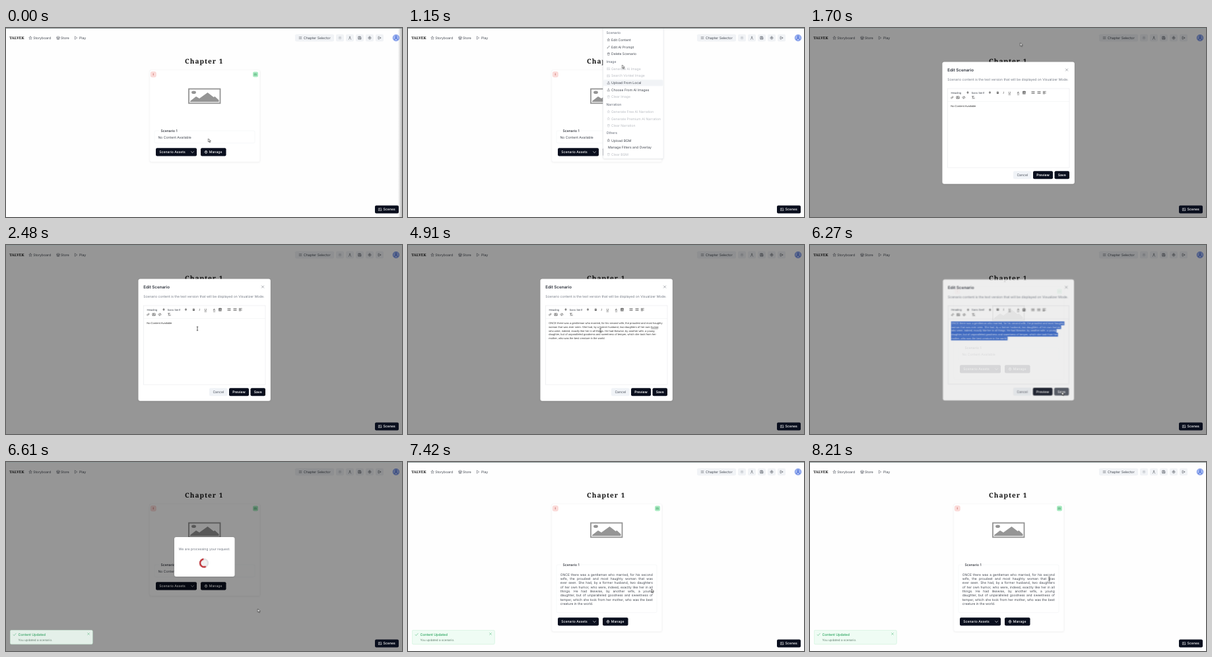
Recreate the animation shown at these times as an HTML page. Size 600 by 287 pixels, loop 8.24 s.

```html
<!DOCTYPE html>
<html lang="en">
<head>
<meta charset="utf-8">
<title>Scenario editor</title>
<style>
  html, body { margin: 0; width: 100%; height: 100%; overflow: hidden; background: #fefefe; }
  svg { display: block; width: 100vw; height: 100vh; }
  text { font-family: Inter, sans-serif; text-rendering: geometricPrecision; white-space: pre; }
  .slab { font-family: "Noto Serif", serif; }
  .rich text { font-family: "Liberation Sans", sans-serif; }
  .pop { transform-box: fill-box; transform-origin: center; }
</style>
</head>
<body>
<svg id="stage" viewBox="0 0 600 287"></svg>
<script>
const LOOP = 8240;
const INK = '#0a0f1e', SLATE = '#40464f', MUTED = '#737984', FAINT = '#b9bcc2', BLUE = '#2f62c9', GREEN = '#25a35a';
const stage = document.getElementById('stage');
const $ = id => document.getElementById(id);

// ---- markup helpers ----
const label = (x, y, str, { size = 5.1, weight = 400, fill = SLATE, more = '' } = {}) =>
  `<text x="${x}" y="${y}" font-size="${size}" font-weight="${weight}" fill="${fill}" ${more}>${str}</text>`;
const box = (x, y, w, h, fill, { r = 2, line = 'none', more = '' } = {}) =>
  `<rect x="${x}" y="${y}" width="${w}" height="${h}" rx="${r}" fill="${fill}" stroke="${line}" stroke-width=".5" ${more}/>`;
const group = (id, body, more = '') => `<g id="${id}" ${more}>${body}</g>`;

// Icons are drawn on a 24 unit grid and centred on x, y.
const shapes = {
  star: 'M12 2l3 7 7 .6-5.4 4.8L18.5 22 12 18l-6.5 4 1.9-7.6L2 9.6 9 9z',
  shop: 'M4 10v11h16V10M2 9l3-6h14l3 6zM9 21v-6h6v6',
  play: 'M6 3l14 9-14 9z',
  lines: 'M3 5h18M3 12h18M3 19h18',
  sun: 'M12 8a4 4 0 1 0 .1 0M12 2v2M12 20v2M2 12h2M20 12h2M5 5l1 1M18 18l1 1M5 19l1-1M18 6l1-1',
  user: 'M12 3a4.5 4.5 0 1 0 .1 0M4 22c0-10 16-10 16 0',
  disk: 'M3 3h14l4 4v14H3zM7 3v5h8V3M7 21v-8h10v8',
  gear: 'M12 2.5a9.5 9.5 0 1 0 .1 0M12 8.5a3.5 3.5 0 1 0 .1 0',
  exit: 'M9 3H3v18h6M15 7l6 5-6 5M21 12H9',
  image: 'M3 4h18v16H3zM8 8a1.5 1.5 0 1 0 .1 0M4 19l6-7 4 4 3-3 4 5',
  pen: 'M3 21l2-6L17 3l4 4L9 19z',
  trash: 'M3 6h18M6 6v15h12V6M9 6V3h6v3',
  upload: 'M3 16v5h18v-5M12 16V3M7 8l5-5 5 5',
  down: 'M5 9l7 7 7-7',
  close: 'M4 4l16 16M20 4L4 20',
  check: 'M3 13l6 6L21 5',
  sort: 'M8 9l4-5 4 5zM8 15l4 5 4-5z',
  code: 'M8 5l-6 7 6 7M16 5l6 7-6 7M14 4l-4 16',
  link: 'M10 14l4-4M11 7l4-4 6 6-4 4M7 11l-4 4 6 6 4-4',
  list: 'M9 5h13M9 12h13M9 19h13M2 5h3M2 12h3M2 19h3',
  align: 'M2 4h20M2 10h12M2 16h20M2 21h12',
  clear: 'M4 4h15M11 4l-3 16M15 14l7 7M22 14l-7 7'
};
const icon = (name, x, y, size = 5.5, color = SLATE, width = 2) =>
  `<path d="${shapes[name]}" transform="translate(${x - size / 2} ${y - size / 2}) scale(${size / 24})" fill="none" stroke="${color}" stroke-width="${width}" stroke-linejoin="round" stroke-linecap="round"/>`;

// ---- page ----
const header = () => {
  const tools = [['sun', 506], ['user', 521], ['disk', 536], ['gear', 551], ['exit', 566]];
  return label(5.3, 17.4, 'TALVEK', { size: 5.5, weight: 800, fill: '#111', more: 'class="slab"' }) +
    icon('star', 37, 15) + label(41.2, 16.9, 'Storyboard') +
    icon('shop', 79, 15) + label(83, 16.9, 'Store') +
    icon('play', 106, 15) + label(111, 16.9, 'Play') +
    box(438, 9.5, 59, 11, '#f1f3f6') + icon('lines', 446, 15, 5) + label(451, 16.9, 'Chapter Selector') +
    tools.map(([name, x]) => box(x - 6, 9.5, 12, 11, '#f1f3f6') +
      icon(name, x, 15, 5.2, name === 'sun' ? '#a3a8b0' : SLATE, 2.4)).join('') +
    `<circle cx="591" cy="15" r="5" fill="#a9bdf3"/>` + icon('user', 591, 14.8, 7, '#2f56cf', 3) +
    `<circle cx="591" cy="15" r="4.7" fill="none" stroke="#5b7be0" stroke-width=".7"/>`;
};

const placeholder = `<rect x="277" y="92.5" width="47.5" height="21.8" fill="#fff" stroke="#959595" stroke-width="1.8"/>
  <ellipse cx="284.5" cy="97.8" rx="3.4" ry="2.3" fill="#959595"/>
  <path d="M279 112.3V111l9-7 5 3 12.5-9 9 7 2-1 6 5.5v2.8z" fill="#959595"/>`;

const tale = [
  'ONCE there was a gentleman who married, for his second',
  'wife, the proudest and most haughty woman that was',
  'ever seen. She had, by a former husband, two daughters',
  'of her own humor, who were, indeed, exactly like her in all',
  'things. He had likewise, by another wife, a young',
  'daughter, but of unparalleled goodness and sweetness of',
  'temper, which she took from her mother, who was the best',
  'creature in the world.'
];

const card = () =>
  box(218, 64, 166.5, 139, '#fff', { line: '#f5f5f6', more: 'id="cardBox" filter="url(#soft)"' }) +
  box(219.3, 66.5, 8, 8, '#fbdcda', { line: '#f6c9c6' }) +
  label(222.5, 72.2, 'I', { size: 4.5, weight: 600, fill: '#b8423d' }) +
  box(374, 66.5, 8, 8, '#a9ebc2') + icon('image', 378, 70.5, 4, '#27834d') +
  placeholder +
  box(225, 156, 152, 18.7, '#fff', { line: '#eef0f3', more: 'id="fieldBox"' }) +
  box(232, 153, 30, 6, '#fff') +
  label(234.5, 158, 'Scenario 1', { weight: 500, fill: '#22262f' }) +
  group('cardEmpty', label(230.5, 168, 'No Content Available')) +
  group('cardTale', tale.map((line, i) => label(230.8, 172.9 + i * 6.27, line, { size: 4.95 })).join('')) +
  group('cardButtons',
    box(227, 182.3, 62, 12.2, INK) + label(232.3, 190.2, 'Scenario Assets', { weight: 500, fill: '#fff' }) +
    icon('down', 282.5, 188.5, 6.5, '#fff', 2.4) +
    box(295, 182.3, 38.5, 12.2, INK) + icon('gear', 303, 188.4, 5.2, '#fff', 3) +
    label(307.8, 190.2, 'Manage', { weight: 500, fill: '#fff' }));

const scenes = box(559, 269.5, 36, 12, INK) + icon('image', 566.8, 275.5, 5.5, '#fff') +
  label(571.5, 277.4, 'Scenes', { weight: 500, fill: '#fff', size: 5.2 });

// ---- menu: text, centre y, icon, enabled; headings have no icon ----
const menuRows = [
  ['Scenario', 7], ['Edit Content', 18, 'star', 1], ['Edit AI Prompt', 28.8, 'pen', 1], ['Delete Scenario', 39.5, 'trash', 1],
  ['Image', 50.7], ['Generate AI Image', 61.9, 'image', 0], ['Search Vonkel Image', 72.6, 'image', 0],
  ['Upload From Local', 83.3, 'upload', 1], ['Choose From AI Images', 94, 'upload', 1], ['Clear Image', 104.5, 'trash', 0],
  ['Narration', 115.7], ['Generate Free AI Narration', 127, 'star', 0], ['Generate Premium AI Narration', 137.7, 'star', 0],
  ['Clear Narration', 148.3, 'trash', 0], ['Others', 159.5], ['Upload BGM', 170.7, 'star', 1],
  ['Manage Filters and Overlay', 181.5, '', 1], ['Clear BGM', 192, 'trash', 0]
];
const menu = box(295.5, -2, 91.5, 200.5, '#fff', { line: '#dfe2e7', more: 'filter="url(#soft)"' }) +
  box(296.2, -4.8, 90, 9.6, '#f1f3f6', { r: 1.5, more: 'id="menuHover"' }) +
  menuRows.map(([str, y, name, on]) => {
    if (name === undefined) return label(300.5, y + 1.8, str, { weight: 500, fill: MUTED });
    const color = on ? SLATE : FAINT;
    return (name ? icon(name, 303.8, y, 4.8, color) : '') + label(name ? 308 : 303, y + 1.8, str, { fill: color });
  }).join('');

// ---- edit dialog ----
const story = [
  'ONCE there was a gentleman who married, for his second wife, the proudest and most haughty',
  'woman that was ever seen. She had, by a former husband, two daughters of her own humor,',
  'who were, indeed, exactly like her in all things. He had likewise, by another wife, a young',
  'daughter, but of unparalleled goodness and sweetness of temper, which she took from her',
  'mother, who was the best creature in the world.'
];
const ROW = 5.77;
const mark = (x, str, more = '') => label(x, 99.9, str, { size: 4.9, fill: '#333', more: 'text-anchor="middle" ' + more });
const tool = (name, x, y) => icon(name, x, y, 5, '#333', 2.6);
const toolbar = label(213.5, 99.6, 'Heading', { size: 4.2 }) + tool('sort', 239, 98) +
  label(244.5, 99.6, 'Sans Serif', { size: 4.2 }) + tool('sort', 272.5, 98) +
  mark(284.5, 'B', 'style="font-weight:700"') + mark(293.3, 'I', 'font-style="italic"') +
  mark(302.3, 'U', 'text-decoration="underline"') + mark(315.5, 'A', 'text-decoration="underline"') +
  box(322.2, 95.8, 4.4, 4.6, '#666', { r: .5 }) + label(322.9, 99.7, 'A', { size: 4.5, fill: '#fff' }) +
  tool('list', 338, 98) + tool('list', 347, 98) + tool('align', 355.3, 98) +
  tool('link', 215.3, 105.5) + tool('image', 224.2, 105.5) + tool('code', 233, 105.5) + tool('clear', 247, 105.5);
const button = (x, w, str, fill, color, weight, more = '') => box(x, 217.3, w, 12, fill, { more }) +
  label(x + w / 2, 225.2, str, { weight, fill: color, more: 'text-anchor="middle"' });

const dialog = box(200.5, 51.5, 200.3, 185.3, '#fff', { r: 3, more: 'filter="url(#soft)"' }) +
  label(208.2, 65.7, 'Edit Scenario', { size: 6.25, weight: 600, fill: '#2d323c' }) + icon('close', 389, 63.5, 5) +
  label(208.2, 80.3, 'Scenario content is the text version that will be displayed on Visualizer Mode.', { size: 5.04, fill: MUTED }) +
  box(208.5, 92, 184.5, 120, '#fff', { r: 0, line: '#e2e4e8' }) +
  box(208.5, 111.5, 184.5, .4, '#e9ebee', { r: 0 }) +
  group('rich', toolbar +
    group('pickEmpty', box(213, 115.8, 39.2, 5.8, BLUE, { r: 0 })) +
    group('editEmpty', `<text x="213.2" y="120" font-size="4.1">No Content Available</text>`) +
    group('pickStory', '') +
    group('editStory', story.map((line, i) => `<text x="213.2" y="${120 + i * ROW}" font-size="4.09">${line}</text>`).join('') +
      `<path id="spell" d="M368.3 127h10.5" stroke="#555" stroke-width=".6"/>`) +
    box(252.2, 115.8, .5, 5.6, '#222', { r: 0, more: 'id="caretA"' }) +
    box(298.7, 138.8, .5, 5.6, '#222', { r: 0, more: 'id="caretB"' }), 'class="rich"') +
  button(308, 27.5, 'Cancel', '#f0f3f7', '#4a505b', 400) +
  button(338, 30, 'Preview', INK, '#fff', 600) +
  button(370.5, 22.5, 'Save', INK, '#fff', 600, 'id="save"');

// ---- notices ----
const busy = box(255, 114, 91.5, 60, '#fff', { r: 3, more: 'filter="url(#soft)"' }) +
  label(300.7, 134.4, 'We are processing your request.', { fill: MUTED, more: 'text-anchor="middle"' }) +
  `<circle cx="300" cy="153.5" r="6" fill="#f1f1f2" stroke="#e2e2e4" stroke-width="2.4"/>
   <circle id="spinner" class="pop" cx="300" cy="153.5" r="6" fill="none" stroke="#bf2b30" stroke-width="2.4" pathLength="100" stroke-dasharray="56 44"/>`;
const toast = box(6.3, 255.3, 125, 21.5, '#effcf4', { line: '#bdeccf' }) +
  icon('check', 13, 262, 5.5, GREEN) +
  label(18.5, 264, 'Content Updated', { weight: 500, fill: GREEN }) +
  label(18.5, 272, 'You updated a scenario.', { size: 4.55, fill: '#5c7a69' }) +
  icon('close', 125, 261, 4.5, GREEN);

const pointer = `<path id="arrow" d="M0 0v5l1.2-1 .8 1.9 1-.4-.8-1.9h1.7z" fill="#fff" stroke="#222" stroke-width=".6"/>
  <path id="beam" d="M-1.2-2.8h2.4M0-2.8v5.6M-1.2 2.8h2.4" stroke="#222" stroke-width=".7" fill="none"/>`;

stage.innerHTML = `<defs>
    <filter id="soft" x="-10%" y="-10%" width="120%" height="120%"><feDropShadow dx="0" dy=".6" stdDeviation="1" flood-opacity=".1"/></filter>
    <linearGradient id="edgeFade"><stop stop-color="#777" stop-opacity="0"/><stop offset="1" stop-color="#777" stop-opacity=".5"/></linearGradient>
  </defs>` +
  box(0, 0, 600, 287, '#fefefe', { r: 0 }) + header() +
  label(271, 54.3, 'Chapter 1', { size: 10, weight: 700, fill: '#111', more: 'class="slab" letter-spacing="1.05"' }) +
  card() +
  box(594, 1, 6, 286, 'url(#edgeFade)', { r: 0, more: 'id="edge"' }) +
  group('menu', menu) +
  box(0, 0, 600, 287, '#000', { r: 0, more: 'id="shade"' }) +
  box(0, 0, 600, 1, '#8d9897', { r: 0 }) + scenes +
  group('dialog', dialog, 'class="pop"') + group('busy', busy, 'class="pop"') +
  group('toast', toast) + group('pointer', pointer);

// Justify the card text by word spacing; size the selection to its lines.
[...$('cardTale').children].slice(0, -1).forEach(el => {
  const gaps = el.textContent.split(' ').length - 1;
  el.style.wordSpacing = (140 - el.getComputedTextLength()) / gaps + 'px';
});
$('pickStory').innerHTML = [...$('editStory').querySelectorAll('text')].map((el, i) =>
  box(213, 115.8 + i * ROW, el.getComputedTextLength() + .8, ROW + .1, BLUE, { r: 0 })).join('');

// ---- motion helpers ----
const play = (id, steps) => {
  const frames = steps.map(([ms, style, easing = 'linear']) => ({ offset: ms / LOOP, easing, ...style }));
  frames.push({ ...frames[frames.length - 1], offset: 1 });
  $(id).animate(frames, { duration: LOOP, iterations: Infinity });
};
const hold = (id, prop, ...steps) => play(id, steps.map(([ms, v]) => [ms, { [prop]: v }, 'step-end']));
// Hidden at first, then switched on and off at each time.
const toggle = (id, ...times) => hold(id, 'opacity', [0, 0], ...times.map((ms, i) => [ms, 1 - i % 2]));
const pop = (id, start, end, from, shown = 1, time = 150) => {
  const off = { opacity: 0, transform: from }, on = { opacity: shown, transform: 'none' };
  play(id, [[0, off], [start, off, 'ease-out'], [start + time, on], [end, on, 'ease-in'], [end + time, off]]);
};
const at = (x, y) => ({ transform: `translate(${x}px, ${y}px)` });

// ---- timeline ----
play('pointer', [
  [0, at(306.5, 168)], [120, at(306.5, 168), 'ease-in-out'], [360, at(316, 187)], [640, at(316, 187), 'ease-in'],
  [900, at(322, 140)], [1150, at(324.5, 56.5), 'ease-out'], [1350, at(320, 17)], [1580, at(320, 17), 'ease-in-out'],
  [2350, at(290, 127)], [4850, at(290, 127)], [4910, at(291.5, 129.5)], [5420, at(291.5, 129.5), 'ease-in-out'],
  [5930, at(381.5, 223)], [7080, at(381.5, 223), 'ease-in-out'], [7650, at(362.5, 177.5)]
]);
toggle('beam', 2150, 5480, 7560);
hold('arrow', 'opacity', [0, 1], [2150, 0], [5480, 1], [7560, 0]);

hold('edge', 'opacity', [0, 1], [880, 0]);
pop('menu', 460, 1470, 'translateY(3px)', 1, 110);
hold('menuHover', 'transform', ...[[0, -20], [800, 181.5], [900, 170.7], [980, 137.7], [1050, 104.5], [1100, 94],
  [1140, 83.3], [1190, 61.9], [1240, 39.5], [1290, 28.8], [1330, 18]].map(([ms, y]) => [ms, `translateY(${y}px)`]));

pop('shade', 1530, 7000, 'none', .41);
pop('dialog', 1530, 6220, 'scale(.95)');
pop('busy', 6340, 7000, 'scale(.95)');
play('spinner', [[0, { transform: 'rotate(54deg)' }], [LOOP - 1, { transform: 'rotate(3654deg)' }]]);
play('toast', [[0, { opacity: 0, ...at(0, 24) }], [6430, { opacity: 0, ...at(0, 24) }, 'ease-out'],
  [6580, { opacity: .85, ...at(0, 0) }], [6700, { opacity: 1, ...at(0, 0) }]]);

toggle('caretA', 2580, 2850);
toggle('caretB', 3910, 4480, 5000, 5180);
toggle('pickEmpty', 3150, 3880);
toggle('pickStory', 5270);
hold('editEmpty', 'opacity', [0, 1], [3880, 0]);
toggle('editStory', 3880);
hold('editEmpty', 'fill', [0, '#333'], [3150, '#fff']);
hold('editStory', 'fill', [0, '#3a3a3a'], [5270, '#e8eefc']);
toggle('spell', 4000, 5270);
hold('save', 'fill', [0, INK], [5900, '#4a4f5c']);

const GROW = 6950;
hold('cardBox', 'height', [0, '139px'], [GROW, '193px']);
hold('fieldBox', 'height', [0, '18.7px'], [GROW, '72.7px']);
hold('cardButtons', 'transform', [0, 'none'], [GROW, 'translateY(54px)']);
hold('cardEmpty', 'opacity', [0, 1], [GROW, 0]);
toggle('cardTale', GROW);
</script>
</body>
</html>
```
